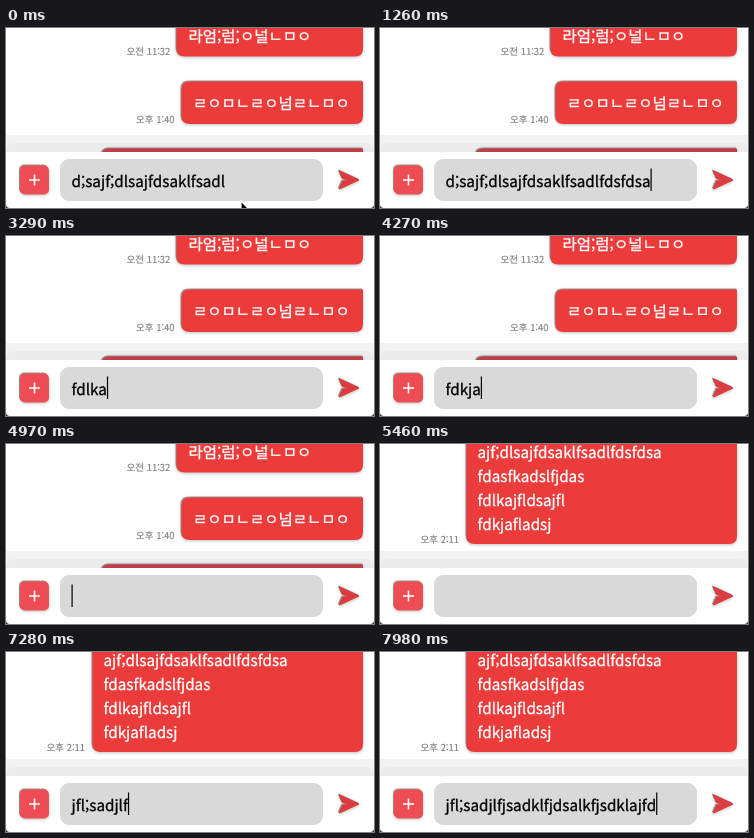
Animation of 368 by 180 pixels, one loop 8 s. Source, as an HTML page:

```html
<!DOCTYPE html>
<html lang="ko">
<head>
<meta charset="utf-8">
<title>Chat input</title>
<style>
  html, body { margin: 0; width: 100%; height: 100%; overflow: hidden; background: #fff; }
  svg { display: block; width: 368px; height: 180px; }
  text {
    font: 15.25px "Noto Sans CJK KR", "Noto Sans CJK JP", "Noto Sans CJK", "Noto Sans", sans-serif;
    text-rendering: geometricPrecision; white-space: pre;
    fill: #000; stroke: #000; stroke-width: .3px;
  }
  .bubble path { fill: #eb3b3b; }
  .bubble text { fill: #fff; stroke: #fff; }
  .bubble .ko { font-size: 15.5px; }
  .bubble .time { font-size: 9.5px; fill: #808080; stroke: #808080; stroke-width: .15px; }
  .bubble path, .soft {
    filter: drop-shadow(-.6px -.6px .3px rgba(90, 70, 70, .55)) drop-shadow(0 1px 1.5px rgba(0, 0, 0, .25));
  }
</style>
</head>
<body>
<svg viewBox="0 0 368 180">
  <defs>
    <clipPath id="list"><rect width="368" height="124"/></clipPath>
    <clipPath id="line"><rect x="60" y="140" width="252" height="24"/></clipPath>
  </defs>
  <rect width="368" height="180" fill="#fff"/>
  <rect y="107" width="368" height="17" fill="#f3f3f3"/>
  <path d="M0 124V120Q2 115 10 115H358Q366 115 368 120V124Z" fill="#ececec"/>
  <g clip-path="url(#list)">
    <g id="before" class="bubble">
      <path d="M170.5 -20H357V20.5Q357 28.5 349 28.5H178.5Q170.5 28.5 170.5 20.5Z"/>
      <text class="ko" x="182.5" y="13.9">라엄;럼;ㅇ널ㄴㅁㅇ</text>
      <path d="M183.5 53.5H357V88Q357 96 349 96H183.5Q175.5 96 175.5 88V61.5Q175.5 53.5 183.5 53.5Z"/>
      <text class="ko" x="187" y="80.7">ㄹㅇㅁㄴㄹㅇ넘ㄹㄴㅁㅇ</text>
      <path style="fill:#c03f44" d="M103.5 120.5H357V140H95.5V128.5Q95.5 120.5 103.5 120.5Z"/>
      <text class="time" x="120.5" y="27">오전 11:32</text>
      <text class="time" x="130" y="94.5">오후 1:40</text>
    </g>
    <g id="after" class="bubble">
      <path d="M86.5 -20H357V92Q357 100 349 100H94.5Q86.5 100 86.5 92Z"/>
      <g id="sent"></g>
      <text class="time" x="40.5" y="98.5">오후 2:11</text>
    </g>
  </g>
  <rect y="124" width="368" height="56" fill="#fff"/>
  <rect class="soft" x="14" y="137.5" width="29" height="29" rx="5" fill="#ef4d54"/>
  <path d="M28.5 146.5V157.5M23 152H34" stroke="#fff" stroke-width="1.6"/>
  <rect x="54" y="131" width="263" height="42" rx="9" fill="#d9d9d9"/>
  <g clip-path="url(#line)">
    <text id="old" x="65.5"></text>
    <text id="typed" x="65.5" y="158.7"></text>
    <rect id="caret" width="1.2" height="22.5"/>
  </g>
  <path class="soft" d="M333.8 143.4L352.3 152L333.8 160.6L336.8 153.8L345 152L336.8 150.2Z"
    fill="#de3b3e" stroke="#de3b3e" stroke-width="1.6" stroke-linejoin="round"/>
  <path id="pointer" d="M0 0V25L5.6 19.8L9.4 29L13.4 27.2L9.6 18.2H17.6Z"
    fill="#000" stroke="#fff" stroke-width="1.2"/>
  <path d="M0 176V180H4Q0 180 0 176ZM368 176V180H364Q368 180 368 176Z" fill="#333"/>
</svg>
<script>
const LOOP = 8000, STEP = 70, LINE = 24, SENT_AT = 5040;
const $ = id => document.getElementById(id);

// open: the line comes into view; letters are added evenly from start to end
const lines = [
  { text: "d;sajf;dlsajfdsaklfsadlfdsfdsa", open: 0, start: 700, end: 1260, first: 23 },
  { text: "fdasfkadslfjdas", open: 1750, start: 2170, end: 2660, first: 1 },
  { text: "fdlkajfldsajfl", open: 3010, start: 3150, end: 3570, first: 1 },
  { text: "fdkjafladsj", open: 3850, start: 4130, end: 4480, first: 1 },
  { text: "fdjsa;fjakls;fjlsadjflsadjjflsadkjflsad", open: 4970, start: 5670, end: 6930, first: 2 },
  { text: "jfl;sadjlfjsadklfjdsalkfjsdklajfd", open: 7000, start: 7000, end: 7980, first: 2 }
];

const clamp = p => Math.min(1, Math.max(0, p));
const easeOut = p => 1 - (1 - p) ** 2;
const mix = (a, b, p) => a + (b - a) * p;

function typedPart({ text, open, start, end, first }, t) {
  if (open > 0 && t < start) return "";
  const gained = (text.length - first) * (t - start) / (end - start);
  return text.slice(0, Math.floor(first + Math.max(0, gained)));
}

lines.slice(0, 4).forEach(({ text }, i) => {
  const row = document.createElementNS("http://www.w3.org/2000/svg", "text");
  row.setAttribute("x", 97.5);
  row.setAttribute("y", 14 + LINE * i);
  row.textContent = i ? text : text.slice(3);
  $("sent").append(row);
});

const show = (id, on) => $(id).setAttribute("visibility", on ? "visible" : "hidden");

function render(time) {
  const t = Math.floor(time / STEP) * STEP;
  show("before", t < SENT_AT);
  show("after", t >= SENT_AT);

  const line = lines.findLast(l => l.open <= t);
  const typed = $("typed");
  typed.textContent = typedPart(line, t);
  const width = typed.textContent ? typed.getComputedTextLength() : 0;

  // The first line slides up as the second comes in
  const rise = LINE * easeOut(clamp((t - lines[1].open + STEP) / (3 * STEP)));
  $("old").textContent = line === lines[1] ? lines[0].text : "";
  $("old").setAttribute("y", 158.7 - rise);
  const drop = line === lines[1] ? LINE - rise : 0;

  $("caret").setAttribute("x", 65.5 + width);
  $("caret").setAttribute("y", 140.5 + drop);
  show("caret", t >= 350 && !(t >= 5460 && t < 5670));

  const p = easeOut(clamp(t / 350));
  $("pointer").setAttribute("transform", `translate(${mix(235, 261, p)} ${mix(173, 139, p)})`);
  show("pointer", t < 770);
}

const begin = performance.now();
function tick() {
  render((performance.now() - begin) % LOOP);
  requestAnimationFrame(tick);
}
tick();
</script>
</body>
</html>
```
